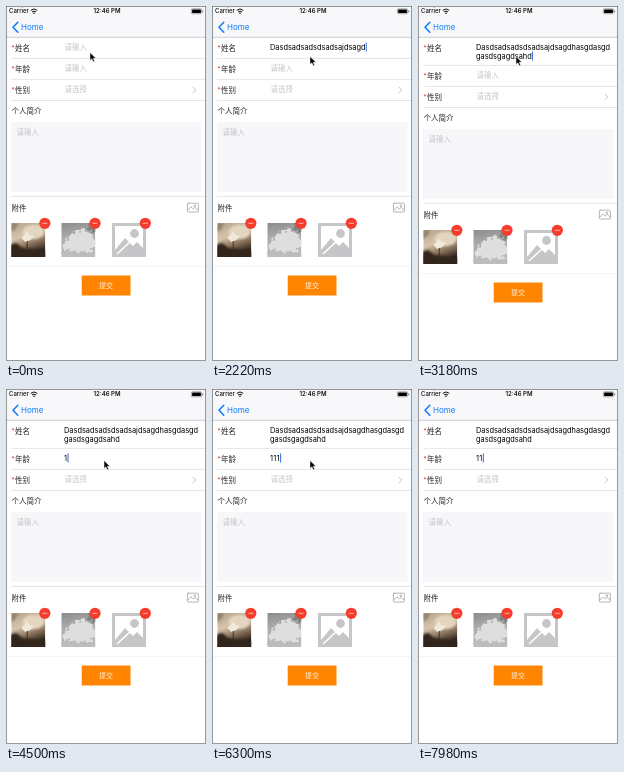
These frames come from a looping animation (200x355 px, 8000 ms). An HTML page:

```html
<!DOCTYPE html>
<html lang="zh">
<head>
<meta charset="utf-8">
<title>Form</title>
<style>
html, body { margin: 0; width: 100%; height: 100%; overflow: hidden; background: #fff; }
svg { display: block; width: 100vw; height: 100vh; }
text { font: 7.5px "Noto Sans CJK SC", "Noto Sans CJK", sans-serif; fill: #222; white-space: pre; }
.latin { font: 7.4px Inter, sans-serif; fill: #000; }
.bar { font: 500 6px Inter, sans-serif; fill: #111; }
.hint { fill: #c4c4c8; }
.star { fill: #e02a1c; }
.rule { stroke: #dcdcde; stroke-width: .7; }
.line { fill: none; stroke-linecap: round; stroke-linejoin: round; }
#age { letter-spacing: .3px; }
</style>
</head>
<body>
<svg viewBox="0 0 200 355" preserveAspectRatio="none">
  <defs>
    <linearGradient id="sepia" x2=".35" y2="1">
      <stop stop-color="#b3a18b"/><stop offset=".45" stop-color="#d6c4ac"/>
      <stop offset=".72" stop-color="#8a735c"/><stop offset="1" stop-color="#2b211a"/>
    </linearGradient>
    <linearGradient id="mist" x2=".2" y2="1">
      <stop stop-color="#8b8b8b"/><stop offset=".45" stop-color="#acacac"/>
      <stop offset="1" stop-color="#b8b8b8"/>
    </linearGradient>
    <filter id="soft"><feGaussianBlur stdDeviation=".8"/></filter>
    <filter id="ragged" x="-20%" y="-20%" width="140%" height="140%">
      <feTurbulence type="fractalNoise" baseFrequency=".22" numOctaves="2" seed="4"/>
      <feDisplacementMap in="SourceGraphic" scale="9" xChannelSelector="R" yChannelSelector="G"/>
      <feGaussianBlur stdDeviation=".4"/>
    </filter>
    <clipPath id="thumb"><rect width="34" height="34"/></clipPath>
    <g id="badge"><circle r="5.6" fill="#f63c2d"/><path d="M-2.5 0h5" stroke="#fff" stroke-opacity=".75" stroke-width=".8"/></g>
  </defs>

  <rect width="200" height="355" fill="#fff"/>
  <rect width="200" height="31" fill="#f8f8fa"/>
  <path d="M0 31.3H200" stroke="#b8b8bb" stroke-width=".7"/>

  <text class="bar" x="3" y="7.4">Carrier</text>
  <g class="line" stroke="#111" stroke-width="1">
    <path d="M25 4.1q3-2.6 6 0M26.3 5.7q1.7-1.4 3.4 0"/>
  </g>
  <circle cx="28" cy="7.2" r=".8" fill="#111"/>
  <text class="bar" x="101" y="7.4" text-anchor="middle" style="font-weight:600">12:46 PM</text>
  <rect x="185.3" y="2.8" width="10.4" height="5" rx="1.2" fill="none" stroke="#555" stroke-width=".5"/>
  <rect x="186.1" y="3.6" width="8.8" height="3.4" rx=".6" fill="#000"/>
  <path d="M196.7 4.5v1.7" stroke="#555" stroke-width=".8"/>
  <path class="line" d="M11.8 16.2L7 21.2l4.8 5" stroke="#087bff" stroke-width="1.5"/>
  <text class="latin" x="15" y="23.9" style="font-size:8px;fill:#087bff">Home</text>

  <text class="star" x="5.3" y="45">*</text><text x="9" y="44.6">姓名</text>
  <text class="hint" id="nameHint" x="58.5" y="43.8">请输入</text>
  <text class="latin" id="name1" x="58" y="43.6"></text>
  <text class="latin" id="name2" x="58" y="52.5"></text>

  <g id="below">
    <path class="rule" d="M5 52.4H200M5 73.4H200M5 94.5H200M5 190.4H200"/>
    <path d="M0 260.5H200" stroke="#f0f0f1" stroke-width=".7"/>
    <text class="star" x="5.3" y="66">*</text><text x="9" y="65.5">年龄</text>
    <text class="hint" id="ageHint" x="58.5" y="64.8">请输入</text>
    <text class="latin" id="age" x="58" y="64.6"></text>
    <text class="star" x="5.3" y="87">*</text><text x="9" y="86.6">性别</text>
    <text class="hint" x="58.5" y="86">请选择</text>
    <path class="line" d="M187 81.2l2.8 2.8-2.8 2.8" stroke="#bdbdc1" stroke-width=".9"/>
    <text x="5.5" y="108">个人简介</text>
    <rect x="5" y="116" width="190.5" height="70" fill="#f7f7f9"/>
    <text class="hint" x="10.5" y="128.6">请输入</text>

    <text x="5.5" y="204.6">附件</text>
    <g class="line" stroke="#a4a4a7" stroke-width=".8">
      <rect x="181.4" y="197.2" width="11" height="8.8" rx=".8"/>
      <path d="M182 204l3-3.2 2.2 2 2-1.4 2.8 2.6"/><circle cx="188.8" cy="199.7" r=".8"/>
    </g>

    <g transform="translate(5.3 217)" clip-path="url(#thumb)">
      <rect width="34" height="34" fill="url(#sepia)"/>
      <g filter="url(#soft)">
        <ellipse cx="22" cy="9" rx="11" ry="7" fill="#e3d5c0"/>
        <path d="M-2 22l7-2 6 5 9 1 16 2v10H-2z" fill="#33271e"/>
        <path d="M0 0h7l-3 6-4 3z" fill="#94836c"/>
      </g>
      <path d="M10 15l4-4 2-3 2 4 5 1-4 4-5 2z" fill="#f1e8da"/>
      <path d="M16 18q-1 8 1 16" fill="none" stroke="#382b1e" stroke-width=".9"/>
    </g>
    <g transform="translate(55.3 217)" clip-path="url(#thumb)">
      <rect width="34" height="34" fill="url(#mist)"/>
      <g filter="url(#ragged)">
        <path d="M1 30q-2-9 5-14 2-8 9-7 7-6 11 1 8 2 9 10l-5 8z" fill="#dedede"/>
        <path d="M0 29q8-4 15 0t19-3v12H0z" fill="#bcbcbc"/>
        <path d="M25 0h12v11l-7-2z" fill="#828282"/>
      </g>
    </g>
    <g transform="translate(106 217)" clip-path="url(#thumb)">
      <rect width="34" height="34" fill="#c6c6c9"/>
      <rect x="3" y="3" width="28" height="28" fill="#fff"/>
      <path d="M3 27l10-12 8 8 4-4 6 6v6H3z" fill="#c6c6c9"/>
      <path d="M5 31L20 17" stroke="#fff" stroke-width="1.6"/>
      <circle cx="22.5" cy="10.5" r="4.4" fill="#c6c6c9"/>
    </g>
    <use href="#badge" x="38.8" y="217.3"/>
    <use href="#badge" x="89" y="217.3"/>
    <use href="#badge" x="139.3" y="217.3"/>

    <rect x="75.7" y="269.5" width="48.8" height="20" fill="#ff8500"/>
    <text x="100" y="282.2" text-anchor="middle" style="font-size:7px;fill:#fff2e4">提交</text>
  </g>

  <rect id="caret" width="1" height="9" fill="#2f66e8"/>
  <path id="pointer" d="M0 0v8l1.9-1.7L3.2 9.3l1.4-.6-1.3-2.9h2.6z" fill="#000" stroke="#fff" stroke-width=".5"/>
  <rect x=".3" y=".3" width="199.4" height="354.4" fill="none" stroke="#555" stroke-width=".6"/>
</svg>
<script>
const LOOP = 8000;
const LINE_LENGTH = 32;
const FULL_NAME = 'Dasdsadsadsdsadsajdsagdhasgdasgdgasdsgagdsahd';
const typing = [[840, 0], [1260, 7], [2220, 23], [3160, 45]];
const ages = [[0, ''], [4440, '1'], [5160, '11'], [5820, '111'], [7440, '11']];
const path = [[60, 84, 46.5], [660, 98, 50.5], [3420, 98, 50.5], [3960, 98, 71.5]];
const NAME_FOCUS = 720, AGE_FOCUS = 4020, POINTER_HIDE = 7440;
const part = Object.fromEntries([...document.querySelectorAll('[id]')].map(e => [e.id, e]));

function between(steps, t, column, ease = x => x) {
  const next = steps.findIndex(step => step[0] > t);
  if (next === 0) return steps[0][column];
  if (next < 0) return steps.at(-1)[column];
  const a = steps[next - 1], b = steps[next];
  return a[column] + (b[column] - a[column]) * ease((t - a[0]) / (b[0] - a[0]));
}

const smooth = x => x * x * (3 - 2 * x);
const show = (element, visible) => element.setAttribute('visibility', visible ? 'visible' : 'hidden');
const move = (element, x, y) => element.setAttribute('transform', `translate(${x} ${y})`);

function render(t) {
  const typed = FULL_NAME.slice(0, Math.floor(between(typing, t, 1) + 1e-6));
  const wrapped = typed.length > LINE_LENGTH;
  const shift = wrapped ? 7 : 0;
  const age = ages.findLast(step => step[0] <= t)[1];

  part.name1.textContent = typed.slice(0, LINE_LENGTH);
  part.name2.textContent = typed.slice(LINE_LENGTH);
  part.age.textContent = age;
  show(part.nameHint, !typed);
  show(part.ageHint, !age);
  move(part.below, 0, shift);

  const inAge = t >= AGE_FOCUS;
  const field = inAge ? part.age : wrapped ? part.name2 : part.name1;
  const width = field.textContent ? field.getComputedTextLength() : 0;
  const top = inAge ? 57.5 + shift : wrapped ? 45.5 : 36.5;
  move(part.caret, 58.2 + width, top);
  show(part.caret, t >= NAME_FOCUS);

  move(part.pointer, between(path, t, 1, smooth), between(path, t, 2, smooth));
  show(part.pointer, t < POINTER_HIDE);
}

function tick() {
  render(performance.now() % LOOP);
  requestAnimationFrame(tick);
}
tick();
</script>
</body>
</html>
```
